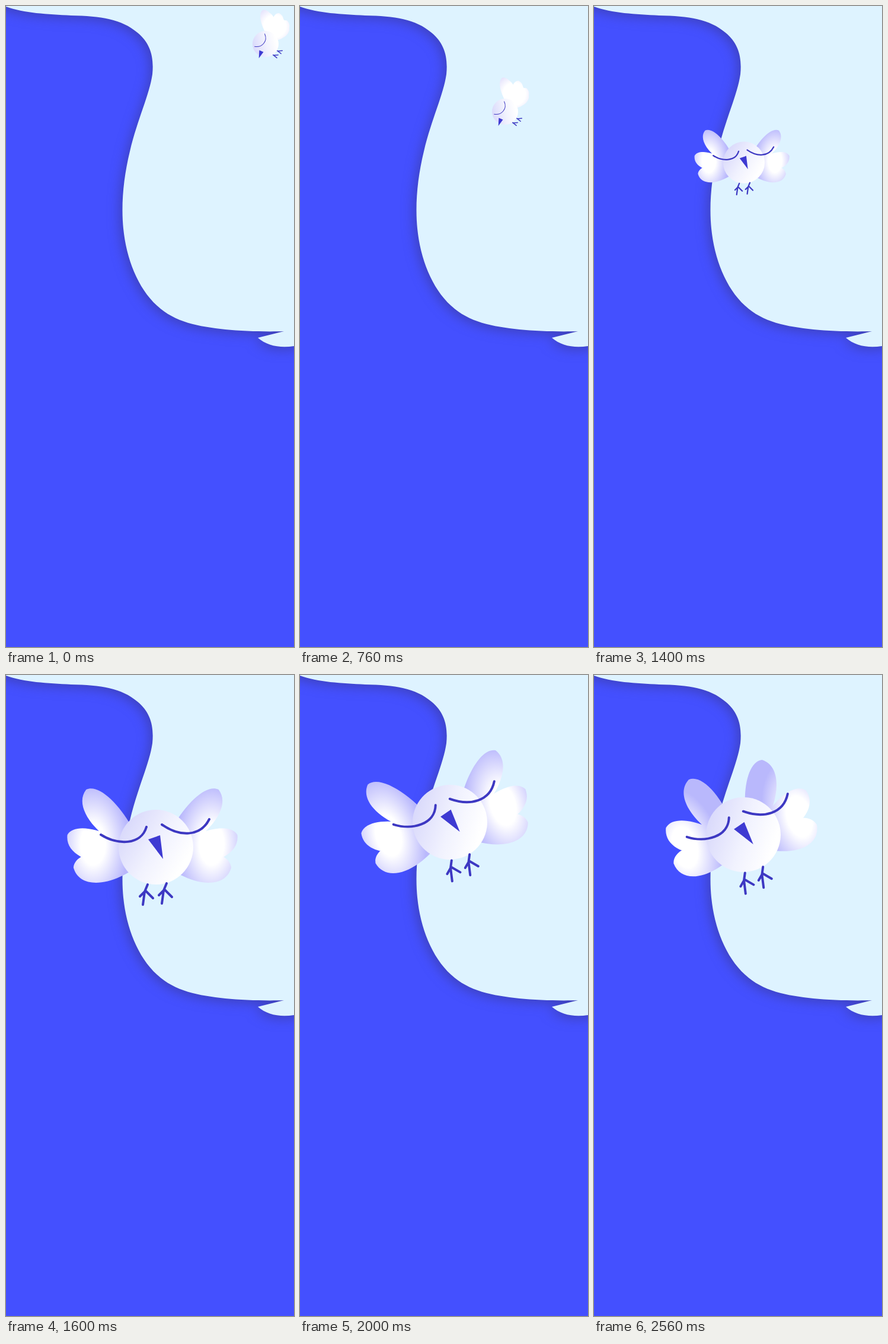
Write an HTML page that moves like this. It is 486x1080 px and loops after 2760 ms.

```html
<!DOCTYPE html>
<html lang="en">
<head>
<meta charset="utf-8">
<title>Bird</title>
<style>
html, body { margin: 0; width: 100%; height: 100%; overflow: hidden; background: #4450ff; }
svg { display: block; width: 486px; height: 1080px; }
.line { fill: none; stroke: #3d38c2; stroke-linecap: round; stroke-linejoin: round; }
.beak { fill: #3e3ad2; }
</style>
</head>
<body>
<svg viewBox="0 0 486 1080">
  <defs>
    <filter id="shade" filterUnits="userSpaceOnUse" x="-80" y="-90" width="660" height="760" color-interpolation-filters="sRGB">
      <feDropShadow dx="-4" dy="4" stdDeviation="10" flood-color="#3a3a9c" flood-opacity=".7"/>
    </filter>
    <radialGradient id="wing" gradientUnits="userSpaceOnUse" r="100" gradientTransform="translate(100 -5) scale(.6 1)" cx="0" cy="0">
      <stop offset=".35" stop-color="#fff"/>
      <stop offset="1" stop-color="#b9b8fc"/>
    </radialGradient>
    <radialGradient id="sideWing" gradientUnits="userSpaceOnUse" cx="32" cy="-10" r="54">
      <stop offset=".35" stop-color="#fff"/>
      <stop offset="1" stop-color="#c3bff8"/>
    </radialGradient>
    <linearGradient id="body" x1=".05" y1=".25" x2=".85" y2=".75">
      <stop offset="0" stop-color="#d9d9fb"/>
      <stop offset=".55" stop-color="#f1f2fe"/>
      <stop offset="1" stop-color="#fff"/>
    </linearGradient>
  </defs>

  <rect width="486" height="1080" fill="#4450ff"/>
  <path filter="url(#shade)" fill="#def3ff" d="M-60-70V-25L0 1C30 12 70 14 110 16C160 17 195 22 222 45C243 62 250 85 247 115C242 150 222 190 209 245C198 290 194 335 198 375C203 425 222 475 255 505C285 533 325 540 370 545C400 548 440 549 469 548L425 559C440 572 462 577 486 573L560 560V-70Z"/>

  <g id="side">
    <path id="low" fill="url(#sideWing)"/>
    <path id="high" fill="url(#sideWing)"/>
    <circle r="22" fill="url(#body)"/>
    <path class="beak" d="M-25 9L-15 0L-12 7Z"/>
    <path class="line" d="M-16-10C-9 0 6 0 11-13"/>
    <path class="line" stroke-width="1.5" d="M-4 22l1 8m-1-7l6 5M6 22l1 8m-1-7l6 5"/>
  </g>

  <g id="front">
    <g id="wings">
      <path id="right" fill="url(#wing)"/>
      <use href="#right" transform="scale(-1 1)"/>
    </g>
    <circle r="63" fill="url(#body)"/>
    <path class="beak" d="M-13-13L7-20L12 20Z"/>
    <path class="line" stroke-width="4" d="M-93-21C-65-3-25-3-16-34M10-38C40-17 75-17 90-47"/>
    <path id="foot" class="line" stroke-width="4" d="M-14 63L-19 75L-27 83M-19 75L-22 97M-18 73L-5 86"/>
    <use href="#foot" x="32" y="-2"/>
  </g>
</svg>
<script>
const $ = id => document.getElementById(id);
const STEP = 40, LOOP = 2760, LAST = 2560;
const SWAP = 1280, GROWN = 1600, TILTED = 2000;
const FLAP = 760, ARRIVE = 1120;

const mix = (a, b, u) => a + (b - a) * u;
const clamp = u => Math.min(1, Math.max(0, u));
const wave = u => (1 - Math.cos(2 * Math.PI * u)) / 2;
const phase = (t, from, to) => wave(clamp((t - from) / (to - from)) / 2);

// Teardrop from a root to a rounded tip, fuller on its outer side
function feather(x, y, angle, length, width) {
  const c = Math.cos(angle), s = Math.sin(angle);
  const at = (along, across) =>
    `${(x + c * along - s * across).toFixed(2)} ${(y + s * along + c * across).toFixed(2)}`;
  const side = (along, across) => at(along * length, across * width);
  return `M${side(0, 0)}C${side(.45, 1.55)} ${side(.95, 1.55)} ${side(1, 0)}`
    + `C${side(.95, -1.1)} ${side(.45, -1.1)} ${side(0, 0)}Z`;
}

// Three feathers sharing a root, each shorter and closer to its neighbour
function fan(x, y, start, spread, length, width) {
  let d = '';
  for (let i = 0; i < 3; i++) {
    const angle = (start + spread * i ** .8) * Math.PI / 180;
    d += feather(x, y, angle, length * (1 - .1 * i), width);
  }
  return d;
}

function place(node, x, y, turn, size) {
  node.setAttribute('transform', `translate(${x} ${y}) rotate(${turn}) scale(${size})`);
}

function drawSide(t) {
  const open = clamp(1.15 * wave(t / FLAP));
  const glide = Math.min(t, ARRIVE), turn = phase(t, FLAP, ARRIVE);
  place($('side'), 438 - .121 * glide - 47 * turn, 64 + .15 * glide + 13 * turn, -45 * (1 - turn), 1);
  $('high').setAttribute('d', fan(10, 4, mix(-60, -102, open), 30, 55, 10));
  $('low').setAttribute('d', fan(10, 4, mix(-55, -18, open), 30, 50, 10));
}

function drawFront(t) {
  const grow = phase(t, SWAP, GROWN), tilt = phase(t, GROWN, TILTED), fold = phase(t, TILTED, LAST);
  place($('front'), 253 - fold, 252 + 38 * grow - 42 * tilt + 21 * fold, -15 * tilt, mix(.36, 1, grow));
  $('wings').setAttribute('transform', `translate(${mix(-6, -1, fold)} 0)`);
  $('right').setAttribute('d', fan(10, 20, mix(-49, -68, fold), mix(32, 38, fold), mix(155, 144, fold), 26));
}

function draw(t) {
  const isSide = t < SWAP;
  $('side').style.display = isSide ? '' : 'none';
  $('front').style.display = isSide ? 'none' : '';
  (isSide ? drawSide : drawFront)(t);
}

const start = performance.now();
function tick() {
  const t = (performance.now() - start) % LOOP;
  draw(Math.min(LAST, Math.floor(t / STEP) * STEP));
  requestAnimationFrame(tick);
}
tick();
</script>
</body>
</html>
```
